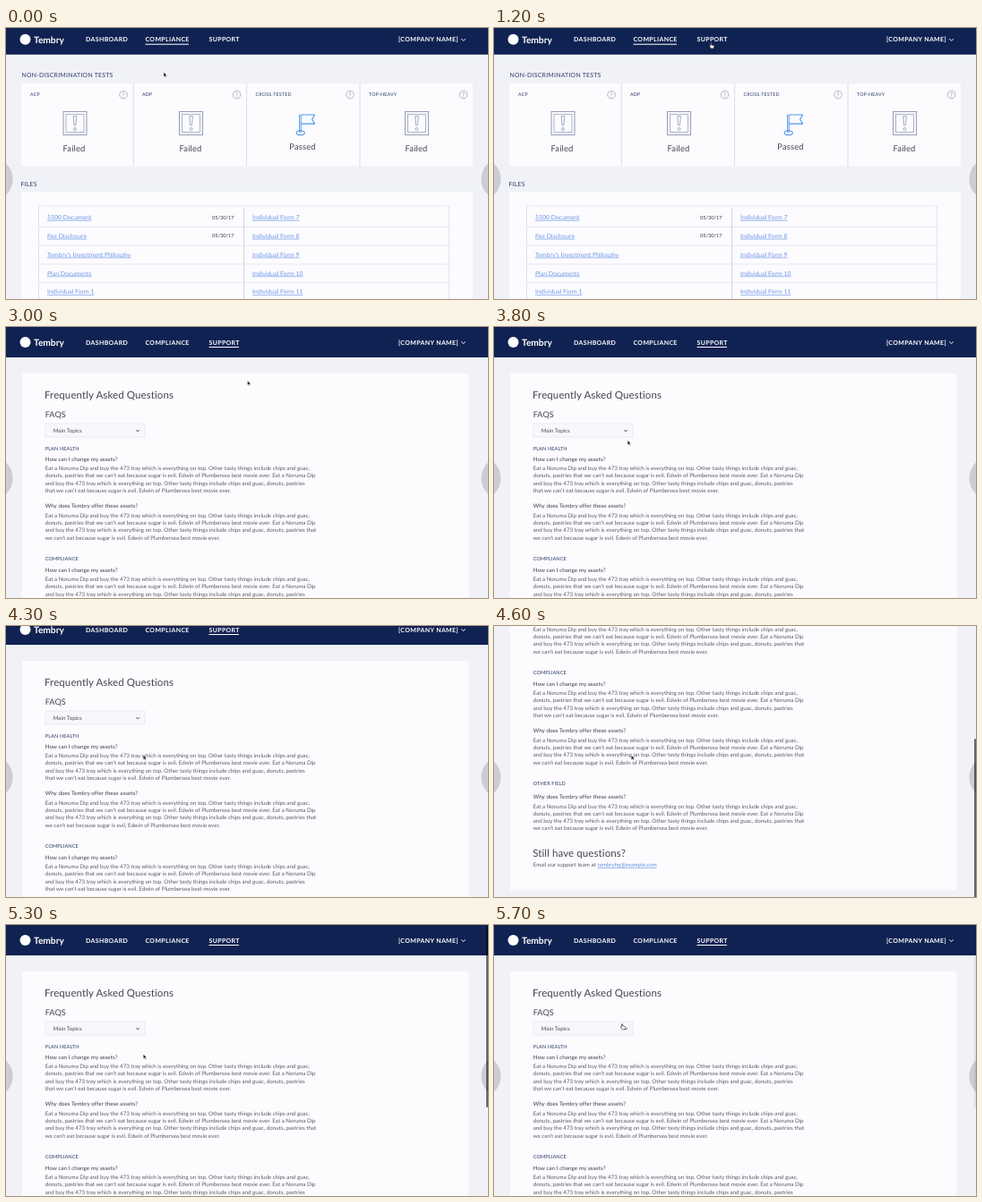
Write an HTML page that moves like this. It is 538 by 303 pixels and loops after 5800 ms.

```html
<!DOCTYPE html>
<html lang="en">
<head>
<meta charset="utf-8">
<title>Plan portal</title>
<style>
  html, body { margin: 0; width: 100%; height: 100%; overflow: hidden; background: #f0f2f8; }
  svg { display: block; width: 538px; height: 303px; font-family: Lato, "Open Sans", sans-serif; text-rendering: geometricPrecision; }
  .link { text-decoration: underline; text-decoration-thickness: 0.5px; }
</style>
</head>
<body>
<svg id="stage" viewBox="0 0 538 303"></svg>
<script>
const NS = 'http://www.w3.org/2000/svg';
const LOOP = 5800, STEP = 100;
const NAVY = '#102252', INK = '#2c3c68', GREY = '#5a5b65', LINK = '#6f98e6', CARD = '#fcfbfe', LINE = '#e0e2eb';

function add(parent, tag, attrs, text) {
  const el = document.createElementNS(NS, tag);
  for (const k in attrs) el.setAttribute(k, attrs[k]);
  if (text) el.textContent = text;
  parent.appendChild(el);
  return el;
}
const group = parent => add(parent, 'g', {});
const rect = (p, x, y, width, height, fill, more) => add(p, 'rect', { x, y, width, height, fill, ...more });
const path = (p, d, stroke, w = 1, fill = 'none') =>
  add(p, 'path', { d, stroke, fill, 'stroke-width': w, 'stroke-linejoin': 'round' });
const label = (p, x, y, text, size, fill, more) =>
  add(p, 'text', { x, y, 'font-size': size, fill, ...more }, text);

const stage = document.getElementById('stage');

function nav(p, dy, active) {
  rect(p, 0, dy - 1, 538, 35, NAVY);
  add(p, 'circle', { cx: 21.5, cy: dy + 17, r: 6, fill: '#fff' });
  label(p, 31, dy + 20.8, 'Tembry', 10.2, '#fff', { 'font-weight': 700 });
  const items = [['DASHBOARD', 89, 46], ['COMPLIANCE', 155.5, 48.5], ['SUPPORT', 226.5, 33.5]];
  const style = { 'font-weight': 700, 'letter-spacing': 0.35 };
  for (const [name, x, w] of items) {
    label(p, x, dy + 19.7, name, 7, '#fff', style);
    if (name === active) rect(p, x, dy + 22, w, 1, '#fff');
  }
  label(p, 438, dy + 19.7, '[COMPANY NAME]', 7, '#fff', style);
  path(p, `M508.3 ${dy + 16.4}l2.2 2.2 2.2-2.2`, '#fff', 1);
}

// Compliance page
function failedIcon(p, cx) {
  const c = '#98a2bd';
  for (const [r, w] of [[13, 1.1], [10, 0.8]])
    rect(p, cx - r, 106.5 - r, r * 2, r * 2, 'none', { stroke: c, 'stroke-width': w });
  path(p, `M${cx - 1.8} 98.5h3.6l-.8 10h-2z`, c, 0.9);
  add(p, 'circle', { cx, cy: 113, r: 1.5, fill: 'none', stroke: c, 'stroke-width': 0.9 });
}

function flagIcon(p) {
  const c = '#4c96e6';
  path(p, 'M327.8 96.5V117M329.6 97H344.6l-3 5 3 5.2H329.6', c, 1.2);
  path(p, 'M329.6 97V117', c, 0.7);
  add(p, 'ellipse', { cx: 328.7, cy: 117.2, rx: 4.6, ry: 2.4, fill: 'none', stroke: c, 'stroke-width': 1.1 });
}

function compliance(p) {
  rect(p, 0, 0, 538, 303, '#f0f2f8');
  nav(p, -4.3, 'COMPLIANCE');
  label(p, 17.5, 54.8, 'NON-DISCRIMINATION TESTS', 6.9, INK, { 'letter-spacing': 0.25 });
  rect(p, 17, 62, 504, 92.5, CARD, { rx: 1 });
  const tests = [['ACP', 27, 77], ['ADP', 152, 206.5], ['CROSS-TESTED', 278.5, 331.5], ['TOP-HEAVY', 405, 458.5]];
  tests.forEach(([name, x, cx], i) => {
    const passed = i === 2, q = 131 + i * 126.5;
    if (i) rect(p, 15.3 + i * 126.4, 62, 1, 92.5, '#dcdee7');
    label(p, x, 76.3, name, 5.3, INK, { 'letter-spacing': 0.2 });
    add(p, 'circle', { cx: q, cy: 74.6, r: 4.3, fill: 'none', stroke: '#8f97b0', 'stroke-width': 0.7 });
    label(p, q, 77, '?', 6.3, '#7e87a4', { 'text-anchor': 'middle' });
    passed ? flagIcon(p) : failedIcon(p, cx);
    label(p, i ? cx - 0.5 : 76, passed ? 135.8 : 137.8, passed ? 'Passed' : 'Failed', 9.4, '#44454f',
      { 'text-anchor': 'middle', 'letter-spacing': 0.15 });
  });

  label(p, 16.5, 176.5, 'FILES', 6.9, INK, { 'letter-spacing': 0.2 });
  rect(p, 17, 183, 504, 130, CARD, { rx: 1 });
  rect(p, 36.5, 199, 458, 120, 'none', { stroke: LINE, 'stroke-width': 0.9 });
  const files = ['5500 Document', 'Fee Disclosure', "Tembry's Investment Philosphy", 'Plan Documents', 'Individual Form 1'];
  files.forEach((name, i) => {
    const y = 213.8 + i * 20.9;
    label(p, 46, y, name, 6.9, LINK, { class: 'link' });
    label(p, 275, y, 'Individual Form ' + (7 + i), 6.9, LINK, { class: 'link' });
    if (i < 2) label(p, 230, y - 0.3, '05/30/17', 5.6, '#3c3d48');
    rect(p, 36.5, 222 + i * 20.8, 458, 0.8, LINE);
  });
  rect(p, 265, 201, 1, 110, '#d3d6e1');
}

// Support page
function paragraph(p, y, late) {
  const lines = [
    'Eat a Noruma Dip and buy the 473 tray which is everything on top. Other tasty things include chips and guac,',
    "donuts, pastries that we can't eat because sugar is evil. Edwin of Plumbersea best movie ever. Eat a Noruma Dip",
    'and buy the 473 tray which is everything on top. Other tasty things include chips and guac, donuts, pastries' + (late ? '' : ' that'),
    (late ? 'that ' : '') + "we can't eat because sugar is evil. Edwin of Plumbersea best movie ever."
  ];
  lines.forEach((s, i) => label(p, 43.7, y + i * 8.27, s, 6.19, GREY));
}

function faq(p, y, text, late) {
  label(p, 43.7, y, text, 6.2, '#3b3c47', { 'letter-spacing': 0.08 });
  paragraph(p, y + (late ? 10 : 10.8), late);
}

function support(p) {
  const ASK = ['How can I change my assets?', 'Why does Tembry offer these assets?'];
  const head = (y, s) => label(p, 43.7, y, s, 5.6, INK, { 'letter-spacing': 0.1 });
  nav(p, 0, 'SUPPORT');
  rect(p, 18, 52, 498.5, 450.5, CARD);
  label(p, 43, 80.2, 'Frequently Asked Questions', 11.5, '#44454f', { 'letter-spacing': 0.1 });
  label(p, 43.7, 101, 'FAQS', 9.2, '#44454f');
  rect(p, 44, 108, 111, 15, '#f7f8fb', { stroke: '#e5e7ee', 'stroke-width': 0.8 });
  label(p, 52.7, 118, 'Main Topics', 6.2, '#4b4c57');
  path(p, 'M145 115l2 2 2-2', '#555a6c', 0.9);
  head(138.4, 'PLAN HEALTH');
  faq(p, 150, ASK[0], true);
  faq(p, 202, ASK[1]);
  head(260.5, 'COMPLIANCE');
  faq(p, 274, ASK[0], true);
  faq(p, 326, ASK[1]);
  head(384.8, 'OTHER FIELD');
  faq(p, 399.8, ASK[1]);
  label(p, 43.2, 465, 'Still have questions?', 11.5, '#44454f', { 'letter-spacing': 0.1 });
  label(p, 43.7, 476, 'Email our support team at ', 6.2, GREY);
  label(p, 115.5, 476, 'tembryhq@example.com', 6.1, '#5a90e4', { class: 'link' });
}

const faqPage = group(stage), filePage = group(stage);
support(faqPage);
compliance(filePage);
for (const cx of [-16.4, 554.4]) add(stage, 'circle', { cx, cy: 169, r: 24, fill: '#8a8b90', 'fill-opacity': 0.36 });
const thumb = rect(stage, 536, 1, 2, 203, '#000', { rx: 1, 'fill-opacity': 0.58 });
const cursor = group(stage);
const arrow = path(cursor, 'M0 0V5l1.2-1 .8 1.8 .9-.4-.8-1.7h1.6z', '#fff', 0.4, '#111');
const hand = path(cursor, 'M-.5 .4q.6-.8 1.1 0V2.4l2.6.6q.7.3.5 1.3l-.6 2.1H.3L-1.7 3.8q0-.8 1.2-.2z', '#222', 0.6, '#fff');

// Tracks are [time, value...] points
function at(track, t, ease = u => u) {
  let i = 0;
  while (i < track.length - 1 && track[i + 1][0] <= t) i++;
  const a = track[i], b = track[i + 1];
  if (!b || t < a[0]) return a.slice(1);
  const u = ease((t - a[0]) / (b[0] - a[0]));
  return a.slice(1).map((v, k) => v + (b[k + 1] - v) * u);
}
const smooth = u => u * u * (3 - 2 * u);

const MOVE = [[0, 176, 49.5], [1200, 242, 16.5], [1900, 242, 16.5], [2500, 269.6, 53], [2600, 269.6, 54],
  [2900, 269.6, 54], [3000, 269.5, 60], [3500, 145, 109], [4100, 153.3, 144.5], [5300, 153.3, 144.5], [5700, 143, 110.5]];
const SCROLL = [[4100, 0], [4200, 3], [4300, 13], [4400, 80], [4500, 165], [4600, 207], [4700, 212],
  [4800, 170], [4900, 65], [5000, 9.5], [5100, 3], [5200, 1], [5300, 0]];
const BAR = [[1200, 0], [1300, 0.5], [1400, 1], [1500, 1], [1800, 0], [4300, 0], [4400, 1], [5400, 1], [5700, 0.12]];

function draw(time) {
  const t = Math.floor(time % LOOP / STEP) * STEP;
  const [x, y] = at(MOVE, t, smooth);
  const [scroll] = at(SCROLL, t);
  const overLink = (x > 225 && x < 262 && y < 24) || (y > 107 && y < 123 && x < 155);
  faqPage.setAttribute('transform', `translate(0 ${-scroll})`);
  filePage.setAttribute('opacity', t < 1300 ? 1 : t < 1400 ? 0.5 : 0);
  thumb.setAttribute('y', 1 + scroll * 0.604);
  thumb.setAttribute('opacity', at(BAR, t)[0]);
  cursor.setAttribute('transform', `translate(${x} ${y})`);
  arrow.setAttribute('opacity', overLink ? 0 : 1);
  hand.setAttribute('opacity', overLink ? 1 : 0);
}

const begin = performance.now();
function tick() {
  draw(performance.now() - begin);
  requestAnimationFrame(tick);
}
tick();
</script>
</body>
</html>
```
